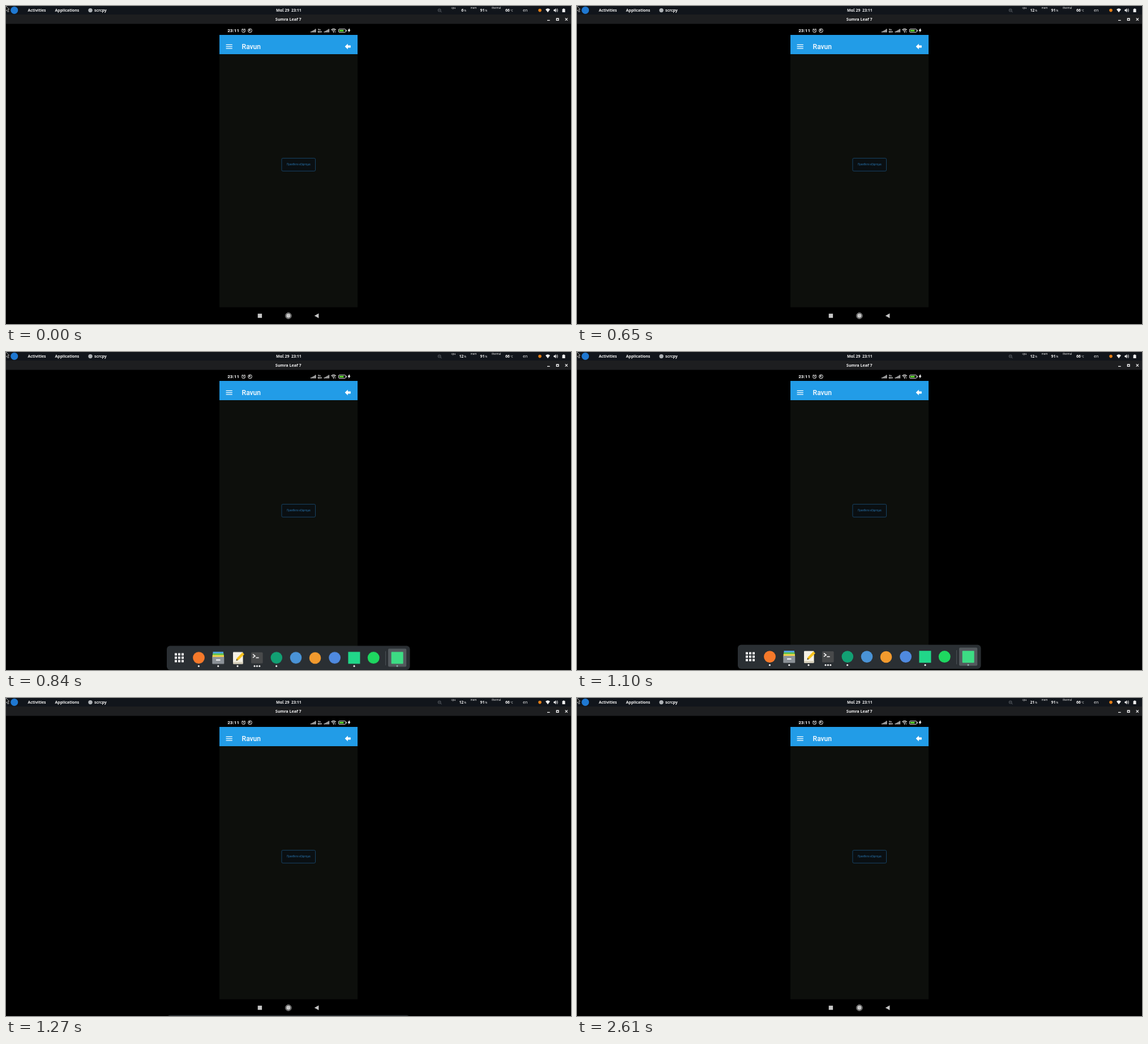
Recreate the animation shown at these times as an HTML page. Size 998 by 561 pixels, loop 2690 ms.

```html
<!DOCTYPE html>
<html lang="en">
<head>
<meta charset="utf-8">
<title>Phone mirror with sliding dock</title>
<style>
  html, body { margin: 0; width: 100%; height: 100%; overflow: hidden; background: #000; }
  svg { display: block; width: 100%; height: 100%; }
  text { font-family: "Noto Sans", sans-serif; fill: #f2f2f2; white-space: pre; }
  .bar { font-size: 6.9px; font-weight: 700; }
  .tiny { font-size: 4.4px; }
  .end { text-anchor: end; }
  .mid { text-anchor: middle; }
  .phone { font-family: Roboto, sans-serif; fill: #fff; }
  .line { fill: none; stroke: #fff; }

  #dock, .cpu { animation: 2690ms step-end infinite; }
  #dock { animation-name: slide; }
  .low  { animation-name: low; }
  .half { animation-name: half; }
  .high { animation-name: high; }

  @keyframes slide {
    0%     { transform: translateY(46px); }
    26.76% { transform: translateY(29px); }
    28.62% { transform: translateY(13.5px); }
    30.11% { transform: translateY(5.5px); }
    31.22% { transform: translateY(1.8px); }
    32.34% { transform: translateY(0); }
    42.37% { transform: translateY(13.5px); }
    43.49% { transform: translateY(23.6px); }
    44.6%  { transform: translateY(31.8px); }
    45.72% { transform: translateY(37.9px); }
    47.21% { transform: translateY(43px); }
    48.32%, 100% { transform: translateY(46px); }
  }
  @keyframes low  { 0% { opacity: 1; } 1.48%, 100% { opacity: 0; } }
  @keyframes half { 0% { opacity: 0; } 1.48% { opacity: 1; } 64.31%, 100% { opacity: 0; } }
  @keyframes high { 0% { opacity: 0; } 64.31%, 100% { opacity: 1; } }
</style>
</head>
<body>
<svg viewBox="0 0 998 561" preserveAspectRatio="none">
  <defs>
    <path id="signal" d="M0 6V4.6H1.4V6ZM2 6V3.6H3.4V6ZM4 6V2.5H5.4V6ZM6 6V1.3H7.4V6ZM8 6V0H9.4V6Z"/>
    <circle id="run" r="1.5" fill="#fff"/>
  </defs>
  <rect width="998" height="561"/>

  <!-- desktop top bar -->
  <rect width="998" height="15" fill="#11151b"/>
  <circle cx="14.7" cy="7.4" r="6.5" fill="#1f78d1"/>
  <path d="M-2-2L5.5 5.8 3 6.3 5 9.6 3.2 10.4 1.2 7.2-1 9Z" fill="#111" stroke="#d8d8d8" stroke-width=".8"/>
  <g class="bar">
    <text x="38.5" y="10.2">Activities</text>
    <text x="86.6" y="10.2">Applications</text>
    <text x="156" y="10.2">scrcpy</text>
    <text x="499.3" y="10.2" class="mid">Μαΐ 29  23:11</text>
    <text x="808.3" y="10.4" class="end cpu low">6</text>
    <text x="808.3" y="10.4" class="end cpu half">12</text>
    <text x="808.3" y="10.4" class="end cpu high">21</text>
    <text x="845.5" y="10.4" class="end">91</text>
    <text x="889.8" y="10.4" class="end">66</text>
    <text x="913" y="10.2" style="font-weight:500">en</text>
  </g>
  <circle cx="149" cy="7.6" r="3.7" fill="#aeb2b6"/>
  <g class="tiny">
    <text x="786.6" y="5">cpu</text>
    <text x="820.6" y="5">mem</text>
    <text x="858" y="5">thermal</text>
    <text x="809.3" y="9.6">%</text>
    <text x="846.5" y="9.6">%</text>
    <text x="890.8" y="9.6">°C</text>
  </g>
  <g fill="none" stroke="#4c5157" stroke-width="1.1">
    <circle cx="765.6" cy="7.4" r="2.4"/><path d="M767.4 9.2L769.4 11.2M764.3 7.4H766.9"/>
  </g>
  <circle cx="943" cy="7.6" r="2.8" fill="#e27d16"/>
  <g fill="#f2f2f2">
    <path d="M953 6Q957 2.6 961 6L957 11.2Z"/>
    <path d="M967.4 6.2H969L971.2 4V11.2L969 9H967.4Z"/>
    <path d="M984 4.4H986.2V5.2H987.6V11H982.6V5.2H984Z"/>
  </g>
  <path class="line" d="M972.3 5.8Q973.4 7.6 972.3 9.4M973.6 4.4Q975.5 7.6 973.6 10.8" stroke-width=".8"/>

  <!-- window title -->
  <rect y="15" width="998" height="16.5" fill="#1d1e20"/>
  <text class="bar mid" x="498.7" y="26" style="font-size:7.1px">Sumra Leaf 7</text>
  <g class="line" stroke-width="1.1">
    <path d="M956 25.4H960.6M987.7 21.3L992 25.6M992 21.3L987.7 25.6"/>
    <path d="M972.4 22H976V25.3H972.4Z" stroke-width="1.3"/>
  </g>

  <!-- phone status bar -->
  <text class="phone" x="391.2" y="46.2" font-size="8.1" font-weight="700">23:11</text>
  <g class="line" stroke-width=".9">
    <circle cx="419.6" cy="43.8" r="2.9"/>
    <path d="M419.6 42V44L420.9 44.8M416.2 41.6L418 40M423 41.6L421.2 40"/>
    <circle cx="431" cy="43.4" r="3.4"/>
    <path d="M429.5 41.8L432.6 44.8M429.6 44.6V42H432"/>
  </g>
  <g fill="#ddd">
    <use href="#signal" x="538" y="40.5"/>
    <use href="#signal" x="561.6" y="40.5"/>
    <path d="M605.8 40L603.7 44H605.6L605 47L608.6 42.6H606.6L607.4 40Z" fill="#fff"/>
  </g>
  <g class="phone mid" font-size="4" font-weight="700">
    <text class="phone" x="553.5" y="42.8">Vo</text>
    <text class="phone" x="554.5" y="46.8">WiFi</text>
  </g>
  <g class="line" stroke-width="1.1">
    <path d="M574.4 42.2Q578.6 38.6 582.8 42.2M575.9 43.9Q578.6 41.6 581.3 43.9"/>
    <rect x="587.4" y="40.6" width="12.6" height="5.8" rx="1.6" stroke-width=".9"/>
    <path d="M601.2 42.3V44.7"/>
  </g>
  <circle cx="578.6" cy="45.6" r="1.1" fill="#fff"/>
  <path d="M580.5 45.2H583L581.8 46.8Z" fill="#ddd"/>
  <rect x="588.8" y="42" width="7.6" height="3" fill="#5bd22f"/>

  <!-- app -->
  <rect x="377" y="51" width="244" height="34" fill="#229ce7"/>
  <path class="line" d="M388.6 68.4H399.8M388.6 71.6H399.8M388.6 74.8H399.8" stroke-width="1.3"/>
  <text class="phone" x="416.6" y="76" font-size="12.1" font-weight="500">Ravun</text>
  <path d="M598.6 71.5L603.8 66.6V69.5H608.8V73.6H603.8V76.4Z" fill="#fff"/>
  <rect x="377" y="85" width="244" height="446.5" fill="#0d0f0c"/>
  <rect x="486.9" y="268.6" width="59.6" height="22.6" rx="2" fill="#0a0f12" stroke="#194a70" stroke-width=".9"/>
  <text class="phone mid" x="516.8" y="281.4" font-size="4.5" style="fill:#2878b4">Προσθετο εξάρτημα</text>

  <!-- phone navigation -->
  <g fill="#c6c6c6">
    <rect x="444.7" y="542.8" width="7.4" height="7.4"/>
    <circle cx="498.8" cy="546.5" r="3.9"/>
    <circle cx="498.8" cy="546.5" r="5.2" fill="none" stroke="#c6c6c6" stroke-width=".9"/>
    <path d="M544.8 546.5L552.4 542.3V550.7Z"/>
  </g>

  <g id="dock">
    <rect x="284" y="516.6" width="429.5" height="42.4" rx="6" fill="#2a2f33"/>
    <path d="M298 531.5H314M298 537.5H314M298 543.5H314" stroke="#fff" stroke-width="4" stroke-dasharray="4 2"/>
    <circle cx="340.5" cy="537.6" r="10.4" fill="#f5792a"/>

    <!-- file drawer -->
    <path d="M365.5 527H384V531H365.5Z" fill="#4ea5e0"/>
    <path d="M365 530H384.6V534H365Z" fill="#63c34c"/>
    <path d="M364.6 533H385V538H364.6Z" fill="#f3d34a"/>
    <rect x="364.3" y="536" width="21" height="12.4" rx="1.2" fill="#8c9298"/>
    <rect x="371" y="540.6" width="7.6" height="2" rx=".6" fill="#fff"/>

    <!-- notes -->
    <rect x="401" y="527.4" width="17.6" height="21" rx="1.2" fill="#f4f1e6"/>
    <path d="M401 545H418.6V547.4Q418.6 548.4 417.6 548.4H402Q401 548.4 401 547.4Z" fill="#d9d2bd"/>
    <path d="M417.6 528.2L421 531.4 410.4 541.8 406.6 542.8 407.4 538.8Z" fill="#f6c21c"/>
    <path d="M407.2 539.8L409.5 542 406.6 542.8Z" fill="#333"/>

    <!-- terminal -->
    <rect x="433" y="528" width="20.6" height="19.6" rx="1.6" fill="#484a4b"/>
    <path class="line" d="M436 531.4L440 534.4 436 537.4M441.4 537.6H446.6" stroke-width="1.5"/>

    <circle cx="477.8" cy="537.6" r="10.3" fill="#12a073"/>
    <circle cx="512" cy="537.6" r="10.3" fill="#4a93d6"/>
    <circle cx="546" cy="538" r="10.3" fill="#f29a2e"/>
    <circle cx="580.6" cy="537.6" r="10.4" fill="#4f8ae0"/>
    <rect x="604.4" y="527.2" width="21" height="21" fill="#21d789"/>
    <circle cx="649.2" cy="537.6" r="10.5" fill="#1ed760"/>
    <path d="M670.5 526V551" stroke="#50565a" stroke-width=".9"/>
    <rect x="675" y="521.4" width="32.2" height="32.2" rx="2" fill="#53595d"/>
    <rect x="680.6" y="527.2" width="21" height="21" rx="1" fill="#3ddc84"/>

    <use href="#run" x="340.4" y="552.2"/>
    <use href="#run" x="374.8" y="552.2"/>
    <use href="#run" x="409" y="552.2"/>
    <use href="#run" x="439" y="552.2"/>
    <use href="#run" x="443.4" y="552.2"/>
    <use href="#run" x="447.8" y="552.2"/>
    <use href="#run" x="477.6" y="552.2"/>
    <use href="#run" x="615" y="552.2"/>
    <circle cx="691" cy="552.2" r="1.4" fill="#8fb8b0"/>
  </g>
</svg>
</body>
</html>
```
